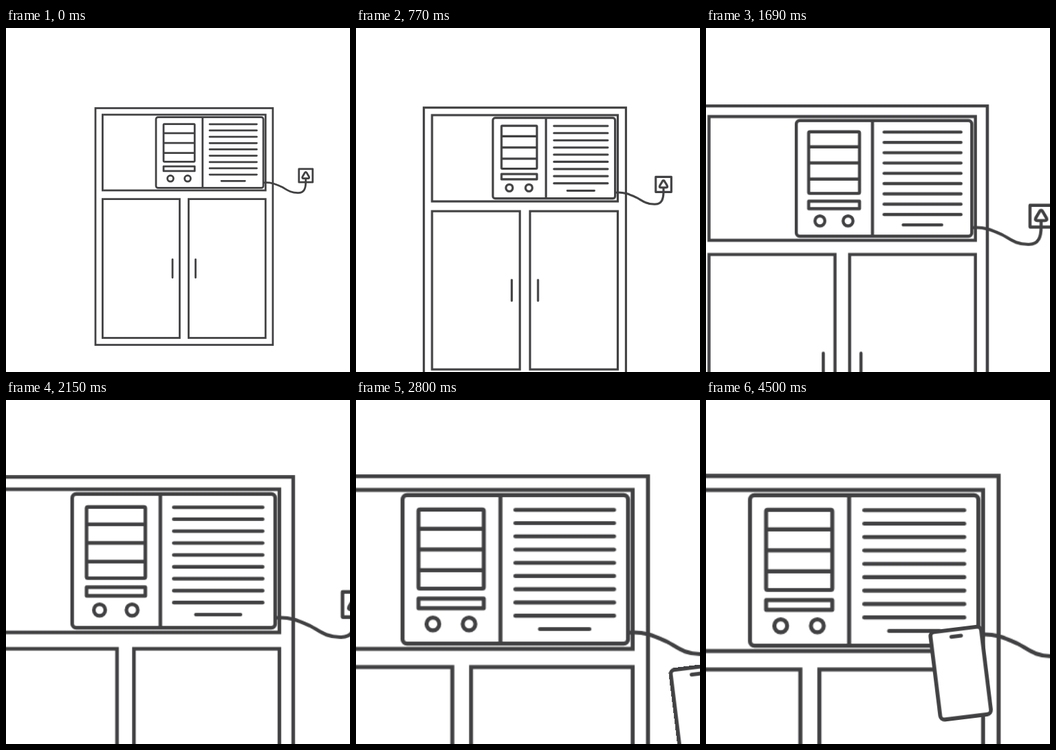
Animation, 500 px wide and 500 px high, one loop 5620 ms. Source, as an HTML page:

```html
<!DOCTYPE html>
<html lang="en">
<head>
<meta charset="utf-8">
<title>Radio and phone</title>
<style>
  html, body { margin: 0; width: 100%; height: 100%; overflow: hidden; background: #fff; }
  svg { display: block; width: 100vw; height: 100vh; }
  #room { transform-origin: 354.6px 121.8px; }
</style>
</head>
<body>
<svg viewBox="0 0 500 500" fill="none" stroke="#414042" stroke-width="2.75">
  <g id="room">
    <g id="cabinet">
      <rect x="130" y="116.5" width="257.8" height="344"/>
      <rect x="140.4" y="126" width="236.8" height="110"/>
      <rect x="140.4" y="248.6" width="112" height="201.8"/>
      <rect x="265.4" y="248.6" width="111.8" height="201.8"/>
      <path d="M242 336.3V362.8M275.5 336.3V362.8" stroke-linecap="round"/>
    </g>
    <g id="radio" stroke-linejoin="round">
      <rect x="218" y="129.6" width="156" height="102.8" rx="3"/>
      <path d="M285.7 129.6V232.4"/>
      <rect x="229" y="139.6" width="45.2" height="54.7" rx="1"/>
      <path d="M229 152.9h45.2M229 167.2h45.2M229 181.6h45.2"/>
      <rect x="229" y="201.2" width="45.2" height="6.7"/>
      <circle cx="239" cy="218.8" r="4.4"/>
      <circle cx="264" cy="218.8" r="4.4"/>
      <path id="grille" stroke-linecap="round"/>
    </g>
    <g id="power">
      <path d="M374.5 224.8C385 223.8 392 227 400.5 230.8C408 234.5 412 239.5 424 239.6C434 240 435.6 232 435.6 224V218.5"/>
      <rect x="425.7" y="204.9" width="20" height="19.3" stroke-linejoin="round"/>
      <path d="M434.3 210.3q1.3-2 2.6 0l3.5 6q.8 2.2-1.4 2.2h-6.8q-2.2 0-1.4-2.2z"/>
    </g>
  </g>
  <g id="phone">
    <g transform="translate(370.2 397) rotate(-7)" stroke-width="5.6">
      <rect x="-37.1" y="-64.1" width="74.2" height="128.2" rx="6" fill="#fff"/>
      <path d="M-7-54H7" stroke-linecap="round"/>
    </g>
  </g>
</svg>
<script>
  const LOOP = 5620;
  const byId = id => document.getElementById(id);

  const slats = Array.from({ length: 9 }, (_, i) => `M296 ${139.8 + i * 9.16}H364.4`);
  byId('grille').setAttribute('d', slats.join('') + 'M313 222.3H347.3');

  // steps: [time in ms, transform, easing to the next step]
  function play(id, steps) {
    const frames = steps.map(([time, transform, easing = 'linear']) =>
      ({ offset: time / LOOP, transform, easing }));
    byId(id).animate(frames, { duration: LOOP, iterations: Infinity }).startTime = 0;
  }

  function start() {
    const now = document.timeline.currentTime || 0;
    play('room', [
      [0, 'scale(1)', 'ease-in-out'],
      [3150, 'scale(2.128)'],
      [LOOP, 'scale(2.128)']
    ]);
    play('phone', [
      [0, 'translate(282px, 118px)'],
      [2000, 'translate(282px, 118px)', 'cubic-bezier(.3333, .6667, .6667, 1)'],
      [4520, 'translate(0px, 0px)'],
      [LOOP, 'translate(0px, 0px)']
    ]);
    document.getAnimations().forEach(a => { a.startTime = now; });
  }
  start();
</script>
</body>
</html>
```
